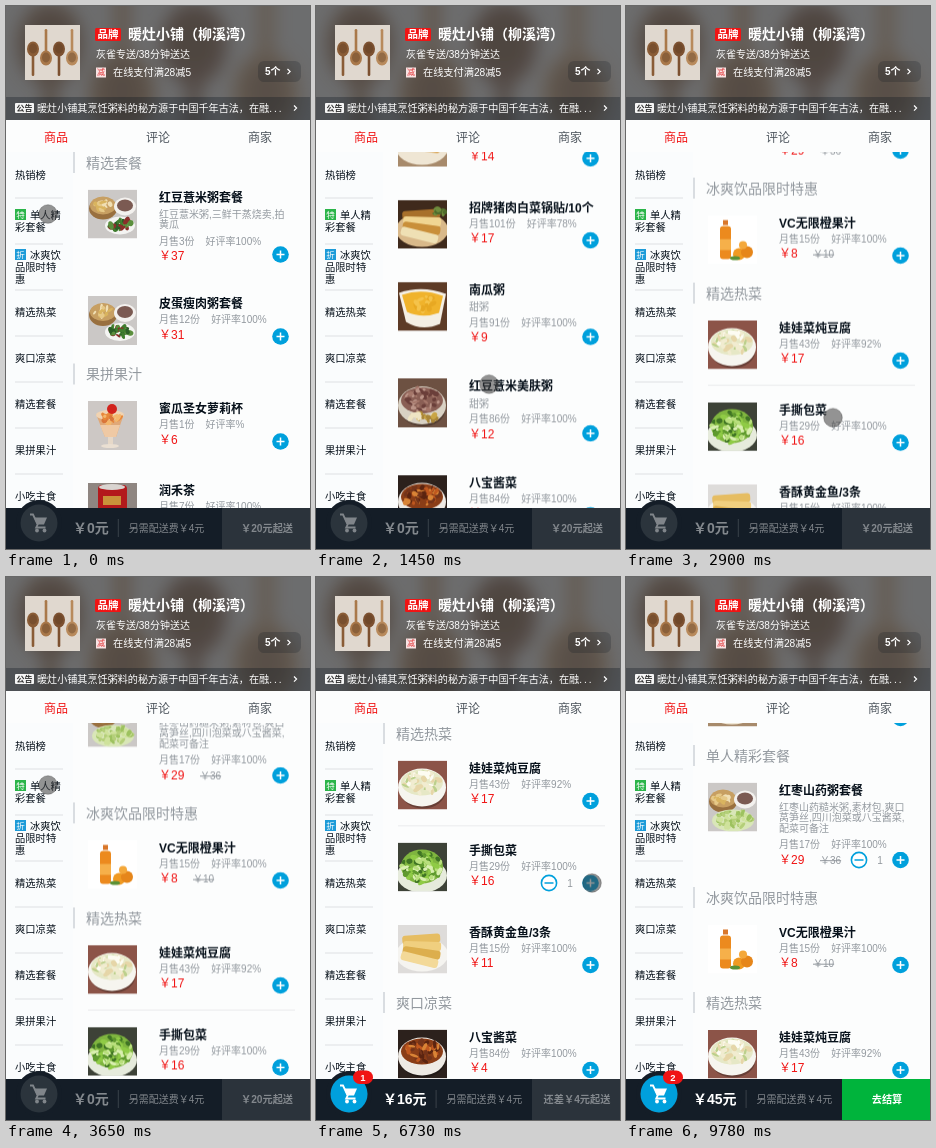
Write an HTML page that moves like this. It is 304 px wide and 543 px high and loops after 9930 ms.

```html
<!DOCTYPE html>
<html lang="zh-CN">
<head>
<meta charset="utf-8">
<title>点餐</title>
<style>
html, body { margin: 0; width: 100%; height: 100%; overflow: hidden; background: #fcfdfd; }
#stage { display: block; width: 100vw; height: 100vh; font-family: "Liberation Sans", "Noto Sans CJK SC", "Noto Sans CJK", sans-serif; }
#list, #cursor, #ball, #ball g, .minus, .step { animation: 9930ms linear infinite; }
.step { animation-timing-function: step-end; }

#list { animation-name: scroll; }
@keyframes scroll {
  0% { transform: translateY(-1433.5px); }
  1.2% { transform: translateY(-1433.5px); animation-timing-function: ease-out; }
  5% { transform: translateY(-729.5px); }
  7.5% { transform: translateY(-729.5px); animation-timing-function: ease-in; }
  14.6% { transform: translateY(-178.5px); animation-timing-function: ease-out; }
  17.6%, 20% { transform: translateY(157px); animation-timing-function: ease-in-out; }
  29.2% { transform: translateY(-846.5px); animation-timing-function: ease-out; }
  31.5%, 35.2% { transform: translateY(-883px); animation-timing-function: ease-out; }
  39%, 43.8% { transform: translateY(-729.5px); animation-timing-function: ease-out; }
  47.6%, 51.75% { transform: translateY(-872.5px); animation-timing-function: ease-out; }
  55.5%, 72% { transform: translateY(-977.5px); animation-timing-function: ease-in-out; }
  82%, 100% { transform: translateY(-708.5px); }
}
#cursor { animation-name: point; }
@keyframes point {
  0%, 4% { transform: translate(42px, 208px); }
  8% { transform: translate(150px, 290px); }
  14.6% { transform: translate(173px, 378px); }
  18% { transform: translate(180px, 430px); }
  22% { transform: translate(215px, 470px); }
  29.2% { transform: translate(207px, 412px); }
  31% { transform: translate(203px, 370px); }
  35%, 41% { transform: translate(42px, 208px); }
  43.5%, 45% { transform: translate(40px, 254px); }
  47.6%, 52.5% { transform: translate(40px, 316px); }
  58.8%, 69% { transform: translate(276px, 306px); }
  73% { transform: translate(200px, 220px); }
  79% { transform: translate(222px, 390px); }
  82.3% { transform: translate(270px, 295px); }
  85%, 90% { transform: translate(275px, 284px); }
  96% { transform: translate(293px, 522px); }
  98.4%, 100% { transform: translate(325px, 560px); }
}

#ball { animation-name: ball-x; }
#ball g { animation-name: ball-y; }
#ball circle { animation-name: ball-on; }
@keyframes ball-x {
  0%, 64.65% { transform: translateX(275px); }
  67.7%, 86.5% { transform: translateX(33px); }
  86.51% { transform: translateX(275px); }
  89.5%, 100% { transform: translateX(33px); }
}
@keyframes ball-y {
  0%, 64.65% { transform: translateY(307px); animation-timing-function: cubic-bezier(.49, -.29, .75, .41); }
  67.7%, 86.5% { transform: translateY(517px); }
  86.51% { transform: translateY(284px); animation-timing-function: cubic-bezier(.49, -.29, .75, .41); }
  89.5%, 100% { transform: translateY(517px); }
}
@keyframes ball-on { 0% { opacity: 0; } 64.65% { opacity: 1; } 67.7% { opacity: 0; } 86.51% { opacity: 1; } 89.5%, 100% { opacity: 0; } }

.minus.first { animation-name: minus-first; }
.minus.second { animation-name: minus-second; }
@keyframes minus-first {
  0%, 64.65% { transform: translateX(42px) rotate(180deg); opacity: 0; }
  67.6%, 100% { transform: none; opacity: 1; }
}
@keyframes minus-second {
  0%, 86.51% { transform: translateX(42px) rotate(180deg); opacity: 0; }
  89.5%, 100% { transform: none; opacity: 1; }
}
.count.first, .filled { animation-name: from-first; }
.count.second, .two { animation-name: from-second; }
.empty { animation-name: until-first; }
.one { animation-name: between; }
@keyframes from-first { 0% { opacity: 0; } 64.65%, 100% { opacity: 1; } }
@keyframes from-second { 0% { opacity: 0; } 86.51%, 100% { opacity: 1; } }
@keyframes until-first { 0% { opacity: 1; } 64.65%, 100% { opacity: 0; } }
@keyframes between { 0% { opacity: 0; } 64.65% { opacity: 1; } 86.51%, 100% { opacity: 0; } }
</style>
</head>
<body>
<svg id="stage" viewBox="0 0 304 543" preserveAspectRatio="none"></svg>
<script>
const RED = '#f01414', BLUE = '#00a0dc', GREY = '#93999f', INK = '#07111b', DIM = '#83888d', PAPER = '#fcfdfd';

let seed = 7;
const rand = () => (seed = (seed * 16807) % 2147483647) / 2147483647;

const rect = (x, y, w, h, fill, more = '') => `<rect x="${x}" y="${y}" width="${w}" height="${h}" fill="${fill}" ${more}/>`;
const oval = (x, y, rx, ry, fill, more = '') => `<ellipse cx="${x}" cy="${y}" rx="${rx}" ry="${ry}" fill="${fill}" ${more}/>`;
const line = (d, color, width = 1) => `<path d="${d}" fill="none" stroke="${color}" stroke-width="${width}"/>`;
// y is the middle of the glyphs
const text = (x, y, s, size, fill, more = '') =>
  `<text x="${x}" y="${y + size * .37}" font-size="${size}" fill="${fill}" ${more}>${s}</text>`;
const BOLD = 'font-weight="700"', MEDIUM = 'font-weight="500"', MID = 'text-anchor="middle"';

function flecks(n, x, y, rx, ry, colors) {
  let out = '';
  for (let i = 0; i < n; i++) {
    const a = rand() * 6.28, r = Math.sqrt(rand());
    const px = x + Math.cos(a) * r * rx, py = y + Math.sin(a) * r * ry;
    out += oval(px, py, 1.5 + rand() * 3, 1 + rand() * 1.8, colors[i % colors.length],
      `transform="rotate(${rand() * 180} ${px} ${py})"`);
  }
  return out;
}
const bowl = (bg, rim, food, colors, n = 40) => rect(0, 0, 49, 49, bg) +
  oval(25, 32, 22, 16, '#0004') + oval(24, 27, 24, 19, rim) + oval(24, 22, 21, 13, food) +
  flecks(n, 24, 22, 18, 11, colors);
const strips = (bg, plate, colors) => rect(0, 0, 49, 49, bg) + oval(24, 30, 26, 17, plate) +
  colors.map((c, i) => rect(5, 10 + i * 7, 38, 9, c, `rx="3" transform="rotate(${i * 6 - 4} 24 25)"`)).join('');
const steamer = () => rect(0, 0, 49, 49, '#cbc8c6') + oval(15, 19, 14, 11, '#99703f') + oval(15, 16, 13, 9, '#c79f62') +
  flecks(14, 15, 16, 9, 5, ['#f0dfb4', '#d9b45f', '#e6c988']) + oval(37, 17, 11, 9, '#f3f1ee') + oval(37, 16, 8, 6, '#7b5a52');

const PHOTOS = {
  meal: () => steamer() + oval(32, 36, 15, 9, '#f4f4f2') + flecks(34, 32, 35, 11, 5, ['#3f7d2e', '#5b8f3d', '#2c5f27', '#8a2f2a']),
  combo: () => steamer() + oval(25, 38, 21, 11, '#d9e6b8') + flecks(50, 25, 37, 18, 8, ['#b4cf79', '#cfe29c', '#9dc25f']),
  plain: () => bowl('#6d4b34', '#f2efe9', '#ece2cc', ['#d6c39a', '#8a7757', '#f8f1e0']),
  noodle: () => bowl('#5a4434', '#e9e4dc', '#b98a4c', ['#d8ac62', '#6f8c3d', '#8b5a2c']),
  pie: () => strips('#a78a6b', '#efe6d4', ['#e2b565', '#e9c47a', '#d9a350']),
  dumpling: () => strips('#3f2a1c', '#d9b98a', ['#a8702b', '#f0d592', '#c98f3a', '#efe0b4']) +
    flecks(8, 40, 12, 7, 4, ['#6f8c3d', '#4f6b2c']),
  pumpkin: () => rect(0, 0, 49, 49, '#5d3b26') + '<path d="M1 11Q24 3 48 12L42 42Q24 50 8 40Z" fill="#f4efe4"/>' +
    '<path d="M4 13Q24 6 45 14L41 31Q24 37 9 30Z" fill="#f0b32c"/>' + flecks(16, 25, 21, 13, 7, ['#f5c34a', '#e8a822']),
  bean: () => bowl('#6d5142', '#d9d2c4', '#8a5f55', ['#6b3f3a', '#a5776a', '#bb9488']) +
    flecks(22, 24, 39, 17, 4, ['#c9a545', '#efe5c4', '#a9863a']),
  pickle: () => bowl('#2c211c', '#eeeae4', '#8a3d17', ['#c0581f', '#5b2410', '#d98436', '#74341a']),
  tofu: () => bowl('#8c5448', '#f6f5ef', '#e6e8c6', ['#fdfcf2', '#bcd08c', '#f1ecd0', '#e6d6a8']),
  cabbage: () => rect(0, 0, 49, 49, '#3d4237') + oval(24, 33, 25, 17, '#e6ebdc') + oval(24, 24, 21, 17, '#7fb53f') +
    flecks(80, 24, 25, 20, 15, ['#b8df7c', '#5f9a2e', '#d9efb0', '#8fcb45', '#3f7424']),
  fish: () => strips('#dedcda', '#f5f4f0', ['#e6bd62', '#f0cf7f', '#dcae4d', '#f3d998']),
  juice: () => rect(0, 0, 49, 49, '#fff') + rect(15, 5, 5, 5, '#d9772a') + rect(12, 11, 11, 33, '#ec8a1e', 'rx="3"') +
    rect(12, 24, 11, 11, '#f6b04a') + oval(31, 39, 6, 6, '#f09a22') + oval(39, 37, 6, 6, '#e6861a') +
    oval(35, 30, 4, 4, '#f4a83a') + oval(27, 43, 5, 2, '#5c9136'),
  cup: () => rect(0, 0, 49, 49, '#cdc8c5') + '<path d="M8 13H36L28 36H17Z" fill="#e0a878"/><path d="M12 24H32L28 36H17Z" fill="#efc9a4"/>' +
    oval(22, 14, 14, 5, '#f0d3b2') + flecks(18, 22, 17, 11, 5, ['#e8873a', '#f3b76c', '#d9763a']) + oval(24, 8, 5, 5, '#d2231d') +
    rect(20, 36, 5, 8, '#e6d8c8') + oval(22, 45, 9, 2, '#eadfd2'),
  can: () => rect(0, 0, 49, 49, '#8f8681') + rect(10, 2, 29, 50, '#b3191c', 'rx="4"') + oval(24, 4, 13, 3, '#d9d4d0') + rect(15, 13, 18, 9, '#c9923a')
};

const dish = (name, sold, rate, price, photo, more) => ({ name, sold, rate, price, photo, desc: [], ...more });
const SECTIONS = [
  ['热销榜', [
    dish('皮蛋瘦肉粥', 229, 100, 10, 'plain', { desc: ['咸粥'] }),
    dish('扁豆焖面', 188, 96, 14, 'noodle'),
    dish('葱花饼', 124, 85, 10, 'pie'),
    dish('牛肉馅饼', 114, 91, 14, 'pie'),
    dish('招牌猪肉白菜锅贴/10个', 101, 78, 17, 'dumpling'),
    dish('南瓜粥', 91, 100, 9, 'pumpkin', { desc: ['甜粥'] }),
    dish('红豆薏米美肤粥', 86, 100, 12, 'bean', { desc: ['甜粥'] }),
    dish('八宝酱菜', 84, 100, 4, 'pickle'),
    dish('红枣山药糙米粥', 81, 91, 10, 'plain'),
    dish('糊塌子', 80, 93, 10, 'pie')]],
  ['单人精彩套餐', [
    dish('红枣山药粥套餐', 17, 100, 29, 'combo', { old: 36, add: 'second',
      desc: ['红枣山药糙米粥,素材包,爽口', '莴笋丝,四川泡菜或八宝酱菜,', '配菜可备注'] })]],
  ['冰爽饮品限时特惠', [dish('VC无限橙果汁', 15, 100, 8, 'juice', { old: 10 })]],
  ['精选热菜', [
    dish('娃娃菜炖豆腐', 43, 92, 17, 'tofu', { rule: true }),
    dish('手撕包菜', 29, 100, 16, 'cabbage', { add: 'first' }),
    dish('香酥黄金鱼/3条', 15, 100, 11, 'fish')]],
  ['爽口凉菜', [
    dish('八宝酱菜', 84, 100, 4, 'pickle'),
    dish('拍黄瓜', 28, 100, 9, 'cabbage')]],
  ['精选套餐', [
    dish('红豆薏米粥套餐', 3, 100, 37, 'meal', { desc: ['红豆薏米粥,三鲜干蒸烧卖,拍', '黄瓜'] }),
    dish('皮蛋瘦肉粥套餐', 12, 100, 31, 'meal')]],
  ['果拼果汁', [
    dish('蜜瓜圣女萝莉杯', 1, '', 6, 'cup'),
    dish('润禾茶', 7, 100, 6, 'can')]]
];

function stepper(y, add) {
  const plus = `<circle cx="274.5" cy="${y}" r="8.3" fill="${BLUE}"/>` + line(`M270.5 ${y}h8M274.5 ${y - 4}v8`, '#fff', 1.5);
  if (!add) return plus;
  return `<g transform="translate(233 ${y})"><g class="minus ${add}"><circle r="7.6" fill="#fff" stroke="${BLUE}" stroke-width="1.6"/>` +
    line('M-4.5 0h9', BLUE, 1.5) + '</g></g>' + text(254, y, '1', 10, GREY, `${MID} class="step count ${add}"`) + plus;
}

function dishRow(d, y) {
  const n = d.desc.length, pitch = 82 + [0, 14.5, 24.5, 37][n];
  const sold = y + 16.5 + [0, 17, 28, 38.5][n], price = sold + 15;
  let out = `<svg x="82" y="${y - 7}" width="49" height="49">${PHOTOS[d.photo]()}</svg>` +
    text(153, y + 1, d.name, 12, INK, BOLD) +
    d.desc.map((s, i) => text(153, y + 18 + i * 10.2, s, 10, GREY)).join('') +
    text(153, sold, `月售${d.sold}份<tspan dx="11">好评率${d.rate}%</tspan>`, 10, GREY) +
    text(153, price, '￥' + d.price, 12, RED) + stepper(y + pitch - 48.5, d.add);
  if (d.old) out += text(194 - (d.price < 10 ? 7 : 0), price + .5, '￥' + d.old, 10, GREY, 'text-decoration="line-through"');
  if (d.rule) out += rect(82, y + 58, 207, 1, '#e3e5e7');
  return [out, pitch];
}

function menu() {
  let y = 0, out = '';
  for (const [title, dishes] of SECTIONS) {
    out += rect(67, y - 10, 2, 21, '#d9dde1') + text(80, y + .5, title, 14, GREY);
    y += 34.5;
    for (const d of dishes) {
      const [row, pitch] = dishRow(d, y);
      out += row;
      y += pitch;
    }
    y -= 11.5;
  }
  return out;
}

const tag = (x, y, s, fill) => rect(x, y, 11, 11, fill) + text(x + 5.5, y + 5.5, s, 8.5, '#fff', MID);

function sidebar() {
  let out = rect(0, 146, 67, 357, '#fafcfd') + text(9, 169, '热销榜', 10.3, INK) +
    tag(9, 203, '特', '#2bb54a') + text(24, 209, '单人精', 10.3, INK) + text(9, 221, '彩套餐', 10.3, INK) +
    tag(9, 243, '折', '#1d9bd8') + text(24, 249, '冰爽饮', 10.3, INK) + text(9, 261, '品限时特', 10.3, INK) + text(9, 273, '惠', 10.3, INK);
  ['精选热菜', '爽口凉菜', '精选套餐', '果拼果汁', '小吃主食'].forEach((s, i) => out += text(9, 306.5 + i * 46, s, 10.3, INK));
  for (let y = 191.5; y < 500; y += 46) out += rect(9, y, 48, 1, '#dfe2e4');
  return out;
}

// round wooden spoons, handles up and down in turn
const spoons = () => ['#8a5c36', '#a9784a', '#7c5030', '#b88a5c'].map((c, i) => {
  const x = 8 + i * 13, y = 24 + i % 2 * 9, up = i % 2;
  return rect(x - 1.3, up ? 4 : y, 2.6, up ? y - 4 : 27, c, 'rx="1.3"') + oval(x, y, 6, 7.5, c) + oval(x, y - .5, 4, 5, '#5d3c2266');
}).join('');

function header() {
  const photo = rect(0, 0, 55, 55, '#e0d8cf') + spoons();
  return '<filter id="soft" x="-20%" y="-20%" width="140%" height="140%"><feGaussianBlur stdDeviation="1.6"/></filter>' +
    `<svg width="304" height="114" viewBox="0 0 55 55" preserveAspectRatio="xMidYMid slice">${rect(0, 0, 55, 55, '#d4cbc3')}` +
    `<g filter="url(#soft)" opacity=".6">${spoons()}</g></svg>` +
    rect(0, 0, 304, 114, '#07111b', 'opacity=".5"') +
    `<svg x="19" y="19" width="55" height="55">${photo}</svg>` +
    rect(89, 22, 26, 13, RED, 'rx="1.5"') + text(102, 28.5, '品牌', 10.5, '#fff', `${MID} ${BOLD}`) +
    text(122, 28, '暖灶小铺（柳溪湾）', 14, '#fff', BOLD) +
    text(90, 48, '灰雀专送/38分钟送达', 10, '#fff', MEDIUM) +
    rect(90, 61.5, 10, 10, '#f9e4e4') + text(95, 66.5, '减', 8, '#e0383a', MID) + text(107, 66, '在线支付满28减5', 10.2, '#fff', MEDIUM) +
    rect(252, 55, 43, 21, '#07111b', 'rx="6" opacity=".2"') + text(259, 65.5, '5个', 10, '#fff', BOLD) + line('M281.5 63l2.6 2.6-2.6 2.6', '#fff', 1.2) +
    rect(0, 91, 304, 23, '#07111b', 'opacity=".3"') + rect(9, 97, 19, 10, '#f5f5f5', 'rx="1"') + text(18.5, 102, '公告', 8, '#333', `${MID} ${BOLD}`) +
    text(31, 102.5, '暖灶小铺其烹饪粥料的秘方源于中国千年古法，在融<tspan letter-spacing="2">...</tspan>', 10.1, '#fff', MEDIUM) +
    line('M288 99.5l2.6 2.6-2.6 2.6', '#fff', 1.2);
}

const tabs = () => rect(0, 114, 304, 32, PAPER) +
  ['商品', '评论', '商家'].map((s, i) => text(50 + i * 102, 131.7, s, 12, i ? '#4d555d' : RED, MID)).join('');

const cartIcon = (disc, color) => `<g transform="translate(33 517)"><circle r="18.5" fill="${disc}"/>` +
  `<path d="M-5-5.500H8L5 1.500H-2Z" fill="${color}"/>` + line('M-9-8.500h3l4.700 10-1.500 3H6.500', color, 1.8) +
  `<circle cx="-2" cy="7.500" r="1.900" fill="${color}"/><circle cx="5.500" cy="7.500" r="1.900" fill="${color}"/></g>`;

function total(state, sum, pay, color, button, payColor) {
  const x = 67 + 28 + 7.8 * String(sum).length;
  return `<g class="step ${state}">` + rect(216, 502, 88, 41, button) +
    text(67, 522, `￥${sum}元`, 14, color, BOLD) + rect(x + 9, 513, 1, 18, '#3a424a') +
    text(x + 20, 522.5, '另需配送费￥4元', 10, DIM) + text(261, 522.5, pay, 10.2, payColor, `${MID} ${BOLD}`) + '</g>';
}
const badge = (state, n) => `<g class="step ${state}">` + rect(37, 493.5, 20, 13.5, RED, 'rx="6.75"') +
  text(47, 500, n, 9.5, '#fff', `${MID} ${BOLD}`) + '</g>';

const footer = () => rect(0, 502, 304, 41, '#141d27') + '<circle cx="33" cy="517" r="23" fill="#141d27"/>' +
  total('empty', 0, '￥20元起送', DIM, '#2b333b', DIM) +
  total('one', 16, '还差￥4元起送', '#fff', '#2b333b', DIM) +
  total('two', 45, '去结算', '#fff', '#00b43c', '#fff') +
  cartIcon('#2b343c', '#80858a') + `<g class="step filled">${cartIcon(BLUE, '#fff')}</g>` +
  badge('one', 1) + badge('two', 2);

document.getElementById('stage').innerHTML =
  rect(0, 0, 304, 543, PAPER) + sidebar() +
  '<clipPath id="view"><rect x="67" y="146" width="237" height="356"/></clipPath>' +
  `<g clip-path="url(#view)"><g id="list">${menu()}</g></g>` +
  header() + tabs() + footer() +
  `<g id="ball"><g><circle class="step" r="6.5" fill="${BLUE}"/></g></g>` +
  '<circle id="cursor" r="9.3" fill="#3c3c3c" fill-opacity=".55" stroke="#333" stroke-opacity=".4" stroke-width=".8"/>';
</script>
</body>
</html>
```
